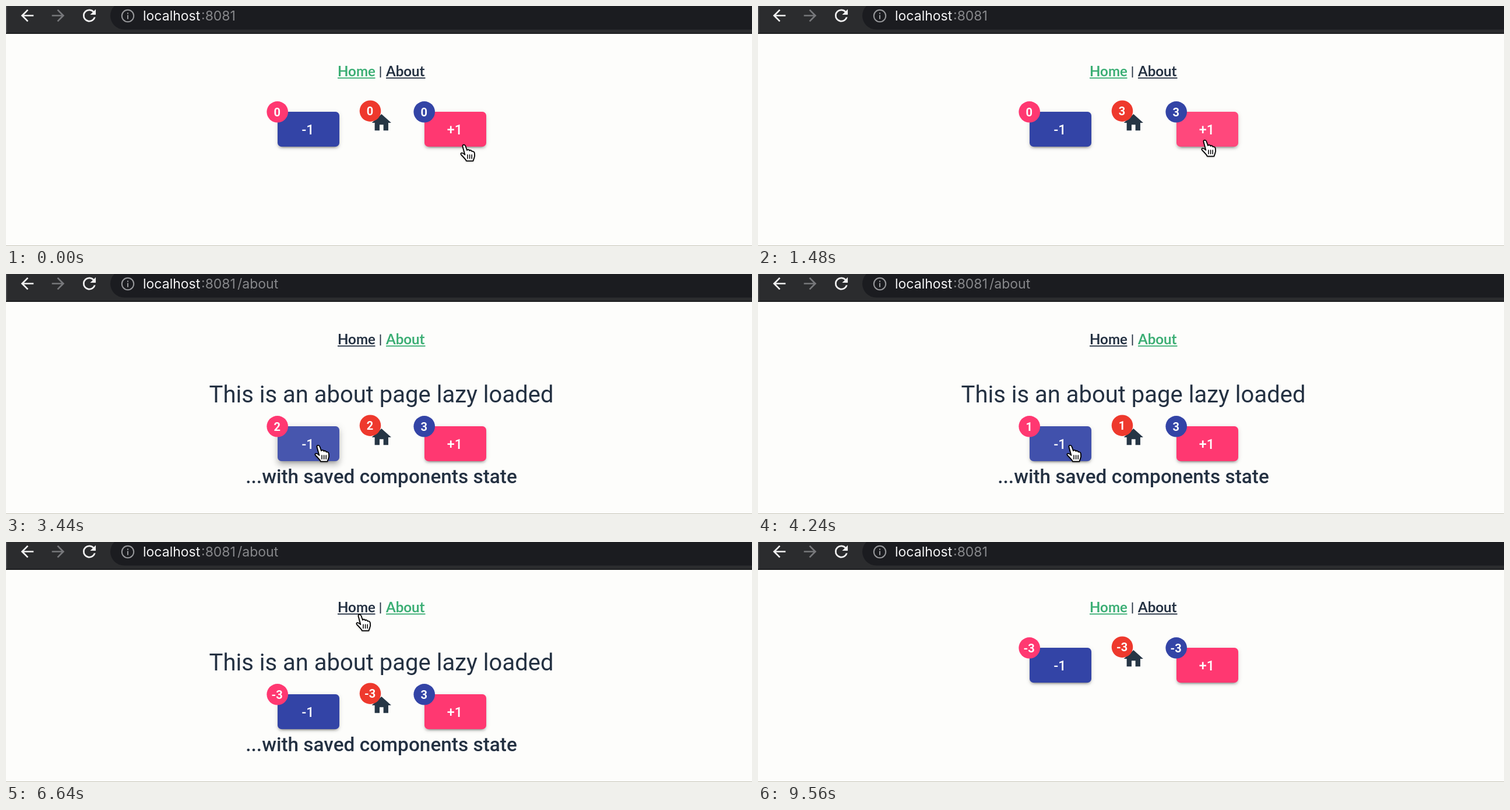
An HTML page with a canvas for the animation above (9.92 s loop, 1280 by 413 pixels).

```html
<!DOCTYPE html>
<html lang="en">
<head>
<meta charset="utf-8">
<title>Counter with lazy route</title>
<style>
html, body { margin: 0; width: 100%; height: 100%; overflow: hidden; background: #fdfdfb; }
canvas { display: block; width: 1280px; height: 413px; }
</style>
</head>
<body>
<canvas id="stage" width="1280" height="413"></canvas>
<script>
const ctx = document.getElementById('stage').getContext('2d');
const LOOP = 9920;
const UNIT = 5 / 3; // screen pixels per CSS pixel of the page
const INK = '#243142', GREEN = '#3bae74', BLUE = '#3344a6', PINK = '#ff3871', RED = '#ee392d';

const ABOUT_AT = 2360, HOME_AT = 6840;
const plusClicks = [480, 840, 1220];
const minusClicks = [3260, 3900, 4520, 5120, 5560, 5920];
const plusHover = [0, 1780], minusHover = [2900, 6150];

// time, x, y of the pointer's hot spot
const route = [
  [0, 786, 240], [360, 767, 232], [1650, 767, 232], [2140, 686, 119],
  [2540, 686, 119], [3080, 536, 296], [6040, 536, 296], [6480, 607, 126],
  [7640, 607, 126], [8040, 636, 128], [8720, 636, 128], [9360, 600, -40], [LOOP, 600, -40]
];

const icon = {
  home: new Path2D('M10 20v-6h4v6h5v-8h3L12 3 2 12h3v8z'),
  back: new Path2D('M20 11H7.83l5.59-5.59L12 4l-8 8 8 8 1.41-1.41L7.83 13H20z'),
  reload: new Path2D('M17.65 6.35A7.96 7.96 0 0 0 12 4a8 8 0 1 0 7.73 10h-2.08A6 6 0 1 1 12 6c1.66 0 3.14.69 4.22 1.78L13 11h7V4z')
};
const handShape = new Path2D('M-2.6 1C-2.6-1.6 1.4-2 2.4 1L5 8.2C6 6.6 9 7 9.5 9C10.5 7.6 13 8.4 13.5 10.4C15 9.4 17.4 10.8 17.8 13C18.4 16 18.4 19 17 22L15.4 26.6H4C3 24 0 21.6-2 19C-4 17-6.6 15-5.4 13.5C-4 12-1 13.5 1.4 16Z');
const handLines = new Path2D('M6 16V22.5M9.6 16V22.5M13.2 16V22.5');
const arrowShape = new Path2D('M0 0V23L5.2 18.2L8.6 26L12.4 24.4L9 16.8H16.4Z');
const beamShape = new Path2D('M-5-12C-2-12 0-11 0-8C0-11 2-12 5-12M0-9V9M-5 12C-2 12 0 11 0 8C0 11 2 12 5 12M-3 3H3');

const clamp = v => Math.min(1, Math.max(0, v));
const ramp = (t, a, b) => clamp((t - a) / (b - a));
const mix = (a, b, k) => a + (b - a) * k;
const ease = k => k * k * (3 - 2 * k);
const count = (list, t) => list.filter(c => t >= c).length;
const inside = (x, y, l, t, r, b) => x >= l && x <= r && y >= t && y <= b;

function text(str, x, y, font, color, align = 'left') {
  ctx.font = font;
  ctx.fillStyle = color;
  ctx.textAlign = align;
  ctx.fillText(str, x, y);
}

function glyph(path, x, y, scale, color, flip = 1) {
  ctx.save();
  ctx.translate(x, y);
  ctx.scale(scale * flip, scale);
  ctx.translate(-12, -12);
  ctx.fillStyle = color;
  ctx.fill(path);
  ctx.restore();
}

function roundRect(x, y, w, h, r) {
  ctx.beginPath();
  ctx.roundRect(x, y, w, h, r);
}

function disc(x, y, r, color) {
  ctx.beginPath();
  ctx.arc(x, y, r, 0, Math.PI * 2);
  ctx.fillStyle = color;
  ctx.fill();
}

function toolbar(about) {
  ctx.fillStyle = '#2b2c2e';
  ctx.fillRect(0, 0, 1280, 47);
  ctx.fillStyle = '#505154';
  ctx.fillRect(0, 0, 1.5, 47);
  ctx.fillStyle = '#161719';
  ctx.fillRect(0, 46.5, 1280, 1.5);
  ctx.fillStyle = '#1b1c20';
  roundRect(179, -7, 1200, 47.5, 23.75);
  ctx.fill();

  glyph(icon.back, 36.5, 16.5, 1.35, '#f3f3f3');
  glyph(icon.back, 89.5, 16.5, 1.35, '#77787b', -1);
  glyph(icon.reload, 143, 16.5, 1.38, '#f3f3f3');

  ctx.strokeStyle = '#97989b';
  ctx.lineWidth = 2;
  ctx.beginPath();
  ctx.arc(209, 17, 10.2, 0, Math.PI * 2);
  ctx.stroke();
  ctx.fillStyle = '#97989b';
  ctx.fillRect(208, 15.5, 2, 7);
  ctx.fillRect(208, 11.5, 2, 2.2);

  const font = '23px Inter, sans-serif';
  text('localhost', 235, 25, font, '#f4f4f5');
  text(':8081', 335, 25, font, '#87888b');
  if (about) text('/about', 397, 25, font, '#87888b');
}

function link(label, x, w, color) {
  text(label, x, 121, 'bold 24px Lato, sans-serif', color);
  ctx.fillRect(x, 123, w, 1.8);
}

// rows: y offset, blur, spread, alpha
const restShadow = [[3, 1, -2, .2], [2, 2, 0, .14], [1, 5, 0, .12]];
const pressShadow = [[5, 5, -3, .2], [8, 10, 1, .14], [3, 14, 2, .12]];

function raise(x, y, w, h, k) {
  const far = 3000;
  ctx.save();
  ctx.fillStyle = '#000';
  ctx.shadowOffsetX = far;
  restShadow.forEach((row, i) => {
    const [dy, blur, spread, alpha] = row.map((v, j) => mix(v, pressShadow[i][j], k));
    const s = spread * UNIT;
    ctx.shadowOffsetY = dy * UNIT;
    ctx.shadowBlur = blur * UNIT;
    ctx.shadowColor = `rgba(0,0,0,${alpha})`;
    roundRect(x - s - far, y - s, w + 2 * s, h + 2 * s, 6.5);
    ctx.fill();
  });
  ctx.restore();
}

function button(label, x, y, color, t, clicks, hover, px, py) {
  const w = 106, h = 60;
  const press = Math.max(...clicks.map(c => ease(ramp(t, c - 120, c)) - ease(ramp(t, c + 30, c + 290))));
  const lit = ramp(t, hover[0], hover[0] + 200) - ramp(t, hover[1], hover[1] + 200);
  raise(x, y, w, h, press);
  ctx.save();
  roundRect(x, y, w, h, 6.5);
  ctx.fillStyle = color;
  ctx.fill();
  ctx.clip();
  ctx.fillStyle = `rgba(255,255,255,${.06 * lit})`;
  ctx.fillRect(x, y, w, h);
  for (const c of clicks) {
    const grow = ramp(t, c - 110, c + 115), fade = 1 - ramp(t, c + 60, c + 400);
    if (grow > 0 && fade > 0) disc(px, py, 115 * ease(grow), `rgba(255,255,255,${.06 * fade})`);
  }
  ctx.restore();
  text(label, x + w / 2 - 1, y + 38.5, '500 23.33px Roboto, sans-serif', '#fff', 'center');
}

function badge(value, x, y, color) {
  disc(x, y, 18.3, color);
  text(value, x - .5, y + 7.2, 'bold 20px Roboto, sans-serif', '#fff', 'center');
}

function pointerAt(t) {
  const i = Math.max(1, route.findIndex(p => p[0] > t));
  const [t0, x0, y0] = route[i - 1], [t1, x1, y1] = route[i];
  const k = ease(ramp(t, t0, t1));
  return [mix(x0, x1, k), mix(y0, y1, k)];
}

function pointerKind(x, y, about, top) {
  const onLink = inside(x, y, 569, 98, 633, 128) || inside(x, y, 652, 98, 720, 128);
  const onButton = inside(x, y, 466, top, 572, top + 60) || inside(x, y, 718, top, 824, top + 60);
  if (onLink || onButton) return 'hand';
  const onText = inside(x, y, 633, 98, 652, 132) ||
    about && (inside(x, y, 351, 184, 937, 232) || inside(x, y, 413, 332, 875, 368));
  return onText ? 'beam' : 'arrow';
}

function pointer(x, y, kind) {
  ctx.save();
  ctx.translate(x, y);
  ctx.lineJoin = ctx.lineCap = 'round';
  if (kind === 'beam') {
    ctx.strokeStyle = '#fdfdfb';
    ctx.lineWidth = 4.5;
    ctx.stroke(beamShape);
    ctx.strokeStyle = '#111';
    ctx.lineWidth = 1.9;
    ctx.stroke(beamShape);
  } else {
    const hand = kind === 'hand', shape = hand ? handShape : arrowShape;
    ctx.shadowColor = 'rgba(0,0,0,.35)';
    ctx.shadowBlur = 3;
    ctx.shadowOffsetY = 1.5;
    ctx.fillStyle = hand ? '#fff' : '#000';
    ctx.fill(shape);
    ctx.shadowColor = 'transparent';
    ctx.strokeStyle = hand ? '#000' : '#fff';
    ctx.lineWidth = 1.8;
    ctx.stroke(shape);
    if (hand) {
      ctx.lineWidth = 1.5;
      ctx.stroke(handLines);
    }
  }
  ctx.restore();
}

function draw(t) {
  const about = t >= ABOUT_AT && t < HOME_AT;
  const top = about ? 262 : 182;
  const added = count(plusClicks, t), total = added - count(minusClicks, t);
  const [px, py] = pointerAt(t);

  ctx.fillStyle = '#fdfdfb';
  ctx.fillRect(0, 0, 1280, 413);
  ctx.fillStyle = '#c5c2b6';
  ctx.fillRect(0, 412, 1280, 1);
  toolbar(about);

  link('Home', 569, 64.5, about ? INK : GREEN);
  ctx.fillStyle = INK;
  ctx.fillRect(641.6, 104, 1.8, 19);
  link('About', 652, 67.5, about ? GREEN : INK);

  if (about) {
    text('This is an about page lazy loaded', 644, 221, '40px Roboto, sans-serif', INK, 'center');
    text('...with saved components state', 644, 360, '500 33.33px Roboto, sans-serif', INK, 'center');
  }

  button('-1', 466, top, BLUE, t, minusClicks, minusHover, px, py);
  button('+1', 718, top, PINK, t, plusClicks, plusHover, px, py);
  glyph(icon.home, 644.3, top + 19, UNIT, '#263645');

  badge(t < ABOUT_AT ? 0 : total, 465.7, top + .3, PINK);
  badge(total, 625, top - 1.3, RED);
  badge(t < HOME_AT ? added : total, 717.7, top + .3, BLUE);

  pointer(px, py, pointerKind(px, py, about, top));
}

const start = performance.now();
function tick() {
  draw((performance.now() - start) % LOOP);
  requestAnimationFrame(tick);
}
tick();
</script>
</body>
</html>
```
